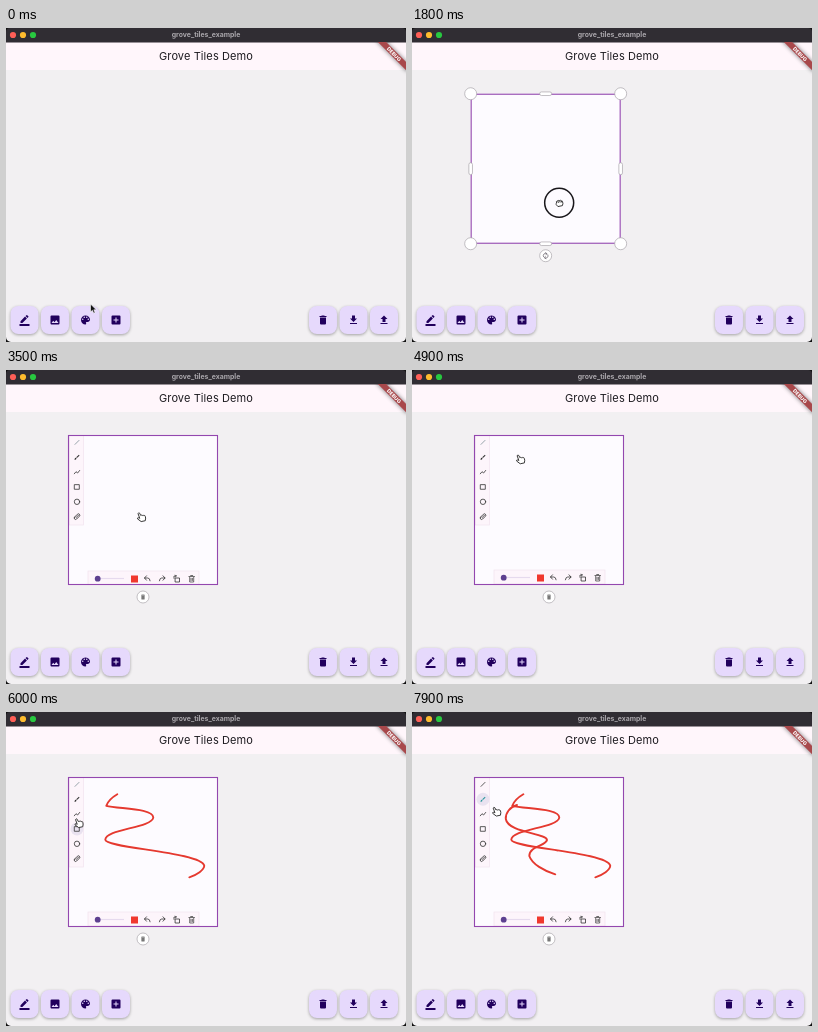
Write an HTML page that moves like this. It is 400 px wide and 314 px high and loops after 8 s.

```html
<!DOCTYPE html>
<html lang="en">
<head>
<meta charset="utf-8">
<title>Board demo</title>
<style>
  html, body { margin: 0; width: 100%; height: 100%; overflow: hidden; background: #f2f0f2; }
  svg { display: block; width: 100vw; height: 100vh; }
  text { font-family: Inter, "Open Sans", sans-serif; text-anchor: middle; }
  .fab rect { fill: #e6d9fc; filter: drop-shadow(0 1.5px 1.5px #0005); }
  .fab { fill: #21005d; }
  .handle { fill: #fff; stroke: #a9a5ab; stroke-width: .7; }
  .line { fill: none; stroke: #333; stroke-width: .8; stroke-linecap: round; stroke-linejoin: round; }
  .panel { fill: #fdf5fb; stroke: #f1e3ee; stroke-width: .7; }
  .ink { fill: none; stroke: #e5392f; stroke-width: 1.9; stroke-linecap: round; stroke-linejoin: round; }
  .hand { fill: #fff; stroke: #333; stroke-width: .9; stroke-linejoin: round; }
</style>
</head>
<body>
<svg viewBox="0 0 400 314" preserveAspectRatio="none">
  <defs>
    <path id="pen" d="M22 24H2v-4h20zM13.06 5.19l3.75 3.75L7.75 18H4v-3.75zM17.88 7.87l-3.75-3.75 1.83-1.83q.7-.6 1.41 0l2.34 2.34q.6.7 0 1.41z"/>
    <path id="image" d="M21 19V5a2 2 0 0 0-2-2H5a2 2 0 0 0-2 2v14a2 2 0 0 0 2 2h14a2 2 0 0 0 2-2zM8.5 13.5l2.5 3L14.5 12l4.5 6H5z"/>
    <g id="palette">
      <path d="M12 3a9 9 0 0 0 0 18c.83 0 1.5-.67 1.5-1.5 0-1-.8-1-.8-2 0-.83.67-1.5 1.5-1.5H16c2.76 0 5-2.24 5-5 0-4.42-4.03-8-9-8z"/>
      <g fill="#e6d9fc"><circle cx="6.5" cy="10.5" r="1.5"/><circle cx="9.5" cy="6.5" r="1.5"/><circle cx="14.5" cy="6.5" r="1.5"/><circle cx="17.5" cy="10.5" r="1.5"/></g>
    </g>
    <path id="add" d="M19 3H5a2 2 0 0 0-2 2v14a2 2 0 0 0 2 2h14a2 2 0 0 0 2-2V5a2 2 0 0 0-2-2zm-2 10h-4v4h-2v-4H7v-2h4V7h2v4h4z"/>
    <path id="trash" d="M6 19a2 2 0 0 0 2 2h8a2 2 0 0 0 2-2V7H6zM19 4h-3.5l-1-1h-5l-1 1H5v2h14z"/>
    <path id="down" d="M19 9h-4V3H9v6H5l7 7zM5 18v2h14v-2z"/>
    <path id="up" d="M9 16h6v-6h4l-7-7-7 7h4zm-4 2h14v2H5z"/>
    <path id="brush" d="M7 14a3 3 0 0 0-3 3c0 1.3-1.16 2-2 2 .92 1.2 2.5 2 4 2a4 4 0 0 0 4-4 3 3 0 0 0-3-3zM20.7 4.6l-1.3-1.3a1 1 0 0 0-1.4 0L9 12.2 11.8 15l9-9a1 1 0 0 0 0-1.4z"/>
    <clipPath id="sheet"><rect width="150" height="150"/></clipPath>
    <clipPath id="page"><rect y="14" width="400" height="300"/></clipPath>
  </defs>

  <rect width="400" height="314" fill="#f2f0f2"/>
  <rect y="14" width="400" height="28" fill="#fff6fb"/>
  <rect width="400" height="14.500" fill="#302d33"/>
  <circle cx="7" cy="7" r="3.1" fill="#ff5f57"/>
  <circle cx="17" cy="7" r="3.1" fill="#febc2e"/>
  <circle cx="27" cy="7" r="3.1" fill="#28c840"/>
  <text x="200" y="9.3" font-size="6.9" font-weight="700" fill="#aaa7ac">grove_tiles_example</text>
  <text x="200" y="32" font-size="11" letter-spacing=".1" fill="#1d1b20">Grove Tiles Demo</text>
  <g clip-path="url(#page)">
    <g transform="translate(400 14) rotate(45)">
      <rect x="-22" y="14" width="44" height="6" fill="#a8484b" style="filter:drop-shadow(0 0 2px #0008)"/>
      <text y="18.9" font-size="5.1" font-weight="800" fill="#fff">DEBUG</text>
    </g>
  </g>

  <g id="item">
    <rect width="150" height="150" fill="#fdfbff"/>
    <g id="editor" clip-path="url(#sheet)">
      <g id="inks">
        <path class="ink" d="M111.300 82.300C105 86 102 89 100.300 93.800C112 97 147.300 96 147.300 105.500C146 116 99.300 117 99.300 127.700C99 136 196 140 198.300 153.800C198 158 191 163 183.300 165.300"/>
        <path class="ink" d="M105 93C98 95 93.300 101 93.800 107C96 121 135 121 135 128C134 134 117.300 134 117.300 144C120 152 132 159 143.300 162.300"/>
      </g>
      <rect class="panel" x="1.500" y="0" width="14" height="90"/>
      <circle id="hover" cx="9" r="6.500" fill="#e9e2f0"/>
      <g id="tools" class="line"></g>
      <g id="bar">
        <rect class="panel" x="20" y="135" width="111" height="14"/>
        <path d="M30 142.500H56" stroke="#e6daee" stroke-width="1.200"/>
        <circle cx="29.700" cy="142.700" r="2.900" fill="#5d4090"/>
        <rect x="63" y="139.500" width="7" height="7" fill="#f0382e"/>
        <g class="line">
          <path d="M78.500 139.800l-2 2.200l2 2.200M76.500 142h3.300q2 0 2.300 2.800"/>
          <path d="M95 139.800l2 2.200l-2 2.200M97 142h-3.300q-2 0-2.300 2.800"/>
          <path d="M107.500 142h4v4h-4zM106 142.300v-2.300h2.300m-.9-.9l.9.9l-.9.9"/>
          <path d="M121.700 141.300v4.700h4v-4.700M120.900 140.500h5.600M122.700 139.500h2M123 142.300v2.200M124.400 142.300v2.200" stroke-width=".7"/>
        </g>
      </g>
    </g>
    <rect x=".5" y=".5" width="149" height="149" fill="none" stroke="#9347af" stroke-width="1.100"/>
    <g id="handles" class="handle"></g>
    <circle class="handle" cx="75" cy="162" r="6"/>
    <path id="spin" class="line" style="stroke:#77727a" d="M72.800 163a2.400 2.400 0 0 1 3.200-3.200m-1.200-.8l1.300.8l-.7 1.300M77.200 161a2.400 2.400 0 0 1-3.200 3.200m1.200.8l-1.300-.8l.7-1.300"/>
    <use id="remove" href="#trash" transform="translate(71.760 158.760) scale(.27)" fill="#777"/>
  </g>

  <g id="fabs"></g>

  <g id="cursor">
    <circle id="ring" r="14.500" fill="none" stroke="#19171b" stroke-width="1.500"/>
    <path id="arrow" d="M0 0V8L1.900 6.300L3.200 9.200L4.600 8.600L3.300 5.800H5.800z" fill="#111" stroke="#fff" stroke-width=".6"/>
    <path id="point" class="hand" transform="rotate(-12 1.500 4)" d="M-.8 .6Q0-.8 .9 .6L1.500 3Q2.500 2.300 3 3.300Q4 2.700 4.400 3.700Q5.600 3.300 5.700 4.600V6.500L4.800 9H.6L-2.400 5.600Q-2.500 4.300-1.200 4.700L-.1 5.500z"/>
    <path id="open" class="hand" transform="rotate(-12)" d="M-2.200 4L-4.300 .8Q-4.200-.5-3 .2L-2.600 .6L-3.300-2.400Q-2.600-3.700-1.800-2.400L-1.200-.7V-3.500Q-.3-4.700 .5-3.500V-.8L1.100-3.200Q2-4 2.500-2.900L2.200-.5L3-2Q4.200-2.400 4.100-1L3.200 2.500L2.500 4.300z"/>
    <path id="fist" class="hand" transform="rotate(-12)" d="M-2 3.500L-3.300 1.200Q-3.600-.3-2.500-.2V-1.600Q-1.700-2.800-.8-1.900Q.1-2.900 1-1.900Q2-2.500 2.500-1.400Q3.600-1.500 3.500-.2V1.500L2.600 3.500zM-.8-1.700V0M1-1.700V0M2.500-1.200V.2"/>
  </g>
  <path d="M0 309V314H5A5 5 0 0 1 0 309zM400 309V314H395A5 5 0 0 0 400 309zM0 4V0H4A4 4 0 0 0 0 4zM400 4V0H396A4 4 0 0 1 400 4z" fill="#111"/>
</svg>

<script>
const LOOP = 8000, STEP = 100;
const $ = id => document.getElementById(id);
const show = (id, on) => { $(id).style.display = on ? '' : 'none'; };
const within = (t, a, b) => t >= a && t < b;
const clamp = v => Math.min(1, Math.max(0, v));
const ease = p => p * p * (3 - 2 * p);
const place = (id, x, y) => $(id).setAttribute('transform', `translate(${x} ${y})`);

const buttons = { pen: 18.5, image: 49, palette: 79.5, add: 110, trash: 317, down: 347.5, up: 378 };
$('fabs').innerHTML = Object.entries(buttons).map(([icon, x]) =>
  `<g class="fab" transform="translate(${x} 292)"><rect x="-14" y="-14" width="28" height="28" rx="8"/>
   <use href="#${icon}" transform="translate(-6 -6) scale(.5)"/></g>`).join('');

const pill = (x, y, w, h) =>
  `<rect x="${x - w / 2}" y="${y - h / 2}" width="${w}" height="${h}" rx="1.8"/>`;
$('handles').innerHTML = [0, 150].map(a =>
  pill(75, a, 12, 3.6) + pill(a, 75, 3.6, 12) +
  [0, 150].map(b => `<circle cx="${a}" cy="${b}" r="6"/>`).join('')).join('');

const TOOL_GAP = 14.85, toolY = i => 7.4 + i * TOOL_GAP;
$('tools').innerHTML = [
  '<path d="M-2 2L2-2"/>',
  '<use href="#brush" transform="translate(-3.240 -3.240) scale(.27)" stroke="none"/>',
  '<path d="M-2.700 1.700L-1-.4L.6 .9L2.700-1.700"/>',
  '<rect x="-2.300" y="-2.300" width="4.600" height="4.600"/>',
  '<circle r="2.700"/>',
  '<path transform="rotate(-45)" d="M-2-1.400H2A1.400 1.400 0 0 1 2 1.400H-2A1.400 1.400 0 0 1-2-1.400M-1.300 0H2"/>'
].map((shape, i) => `<g transform="translate(9 ${toolY(i)})">${shape}</g>`).join('');
const [lineTool, brushTool] = $('tools').children;

// The item's first and final place; ink is drawn in stage coordinates.
const HOME = [30, 72], DROP = [62, 65];
place('inks', -DROP[0], -DROP[1]);

const strokes = [[5000, 5600], [6600, 7300]].map(([from, to], i) => {
  const path = $('inks').children[i], length = path.getTotalLength();
  path.style.strokeDasharray = `${length} ${length + 10}`;
  return { from, to, path, length };
});

const stops = [
  [0, 84.5, 276], [200, 80, 290], [400, 80, 290], [1200, 118.5, 181], [1400, 118.5, 181],
  [1900, 150.5, 174], [2200, 124, 124.5], [2700, 124, 124.5], [3500, 133.5, 142.5],
  [4900, 106.6, 84.7], [5000, 111, 82.5], [5600, 183, 165.5], [6000, 71, 106.5],
  [6200, 71, 88], [6300, 71, 88], [6600, 105, 93], [7300, 143, 162.5], [7900, 82.7, 95], [8000, 79, 98]
];
const presses = [[200, 300], [1400, 1900], [2200, 2300], [2400, 2500]];

function pointer(t) {
  const s = strokes.find(s => within(t, s.from, s.to));
  if (s) {
    const p = s.path.getPointAtLength(s.length * (t - s.from) / (s.to - s.from));
    return [p.x, p.y];
  }
  const i = stops.findIndex(stop => stop[0] > t);
  const [t0, x0, y0] = stops[i - 1], [t1, x1, y1] = stops[i];
  const p = ease((t - t0) / (t1 - t0));
  return [x0 + (x1 - x0) * p, y0 + (y1 - y0) * p];
}

function draw(t) {
  const editing = t >= 2600, brushing = t >= 6300;
  const pressed = presses.some(([a, b]) => within(t, a, b));
  const drag = ease(clamp((t - 1400) / 500));
  const [x, y] = pointer(t);

  show('item', t >= 400);
  place('item', ...HOME.map((v, i) => v + (DROP[i] - v) * drag));
  for (const id of ['editor', 'remove']) show(id, editing);
  for (const id of ['handles', 'spin']) show(id, !editing);
  place('bar', 0, t < 4200 ? 1 : 0);

  for (const s of strokes) {
    const p = clamp((t - s.from) / (s.to - s.from));
    s.path.style.strokeDashoffset = s.length * (1 - p);
    s.path.style.display = p ? '' : 'none';
  }

  const tool = Math.round((y + 6 - DROP[1] - toolY(0)) / TOOL_GAP);
  const hovering = editing && x < 78;
  show('hover', hovering || brushing);
  $('hover').setAttribute('cy', toolY(brushing ? 1 : tool));
  lineTool.style.stroke = brushing ? '#333' : '#7d9096';
  brushTool.style.fill = brushing ? '#2b969c' : '#333';

  place('cursor', x, y);
  const onItem = within(t, 800, 2600);
  show('ring', pressed);
  show('arrow', t < 200 || within(t, 500, 800));
  show('open', onItem && !pressed);
  show('fist', onItem && pressed);
  show('point', within(t, 200, 500) || editing);
}

const start = performance.now();
function tick() {
  const t = (performance.now() - start) % LOOP;
  draw(Math.floor(t / STEP) * STEP);
  requestAnimationFrame(tick);
}
tick();
</script>
</body>
</html>
```
